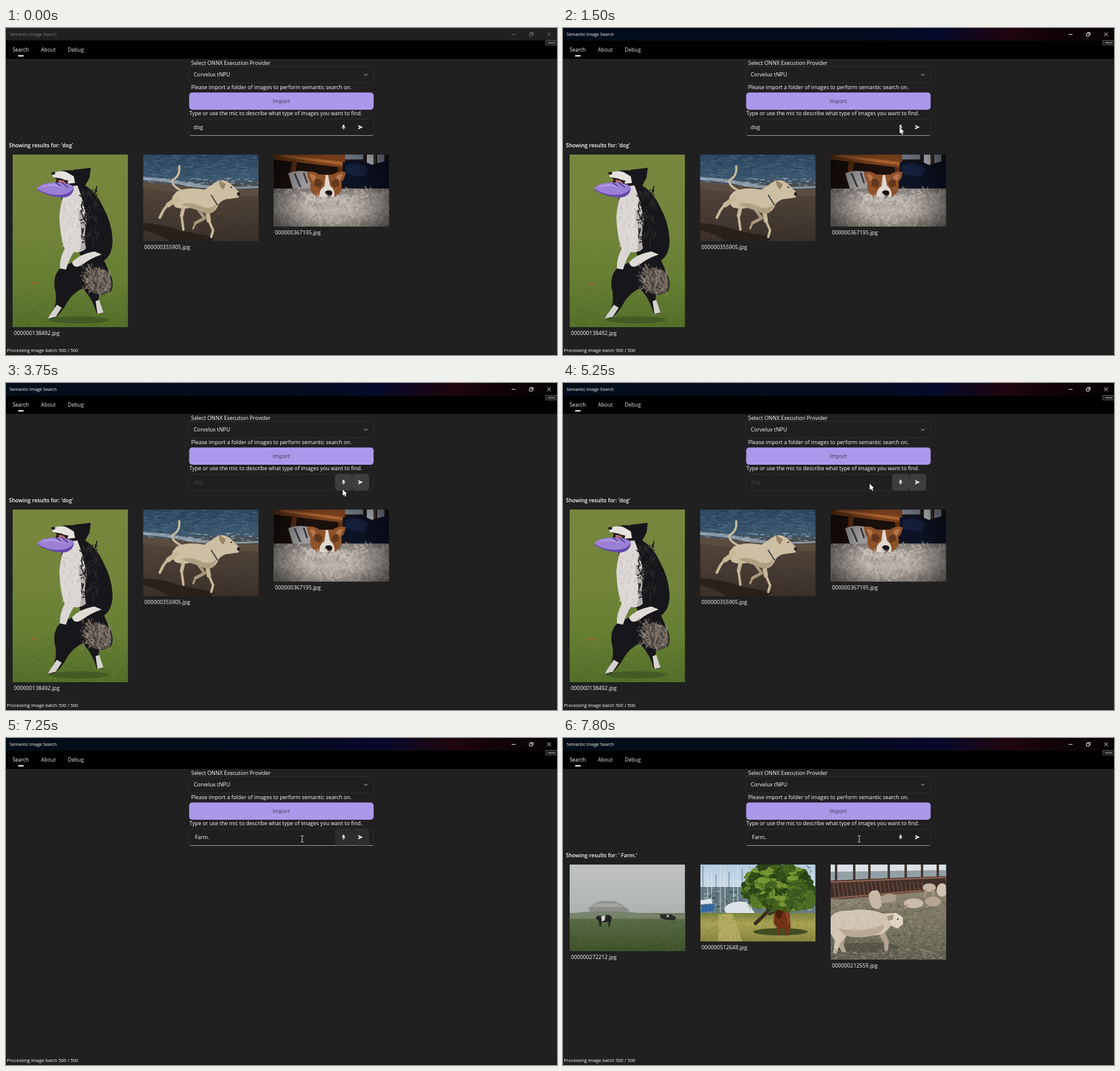
An HTML page with a canvas that plays this animation: 910 by 540 pixels, repeating every 8 s.

```html
<!DOCTYPE html>
<html lang="en">
<head>
<meta charset="utf-8">
<title>Semantic Image Search</title>
<style>
html, body { margin: 0; width: 100%; height: 100%; overflow: hidden; background: #202020; }
canvas { display: block; width: 910px; height: 540px; }
</style>
</head>
<body>
<canvas id="stage" width="910" height="540"></canvas>
<script>
const W = 910, H = 540, LOOP = 8000;
const stage = document.getElementById('stage').getContext('2d');
let g = stage, seed = 1;

const clamp = v => Math.max(0, Math.min(1, v));
const ramp = (t, a, b) => clamp((t - a) / (b - a));
const ease = u => u * u * (3 - 2 * u);
const mix = (a, b, u) => a + (b - a) * u;
const rand = () => (seed = (seed * 16807) % 2147483647) / 2147483647;

function text(str, x, y, size = 8.85, color = '#fff', weight = 400) {
  g.font = `${weight} ${size}px "Open Sans", sans-serif`;
  g.fillStyle = color;
  g.fillText(str, x, y);
}
function rect(color, x, y, w, h) { g.fillStyle = color; g.fillRect(x, y, w, h); }
function shape(color, d) { g.fillStyle = color; g.fill(new Path2D(d)); }
function line(color, width, d) {
  g.strokeStyle = color;
  g.lineWidth = width;
  g.stroke(new Path2D(d));
}
function oval(color, x, y, rx, ry, turn = 0) {
  g.fillStyle = color;
  g.beginPath();
  g.ellipse(x, y, rx, ry, turn, 0, 7);
  g.fill();
}
function panel(x, y, w, h, r, fill, border) {
  g.beginPath();
  g.roundRect(x, y, w, h, r);
  g.fillStyle = fill;
  g.fill();
  if (border) { g.strokeStyle = border; g.lineWidth = 1; g.stroke(); }
}
function fade(x0, y0, x1, y1, stops) {
  const f = g.createLinearGradient(x0, y0, x1, y1);
  stops.forEach(([at, color]) => f.addColorStop(at, color));
  return f;
}
// Scattered short strokes: grass, fur, straw, ripples.
function tufts(colors, n, x, y, w, h, dx, dy, width = 0.7) {
  g.lineWidth = width;
  for (const color of colors) {
    g.beginPath();
    for (let i = 0; i < n; i++) {
      const px = x + rand() * w, py = y + rand() * h;
      g.moveTo(px, py);
      g.lineTo(px + (rand() - 0.5) * dx, py + (rand() - 0.5) * dy);
    }
    g.strokeStyle = color;
    g.stroke();
  }
}
function blobs(colors, n, x, y, rx, ry, size) {
  for (let i = 0; i < n; i++) {
    const a = rand() * 6.283, r = Math.sqrt(rand());
    oval(colors[i % colors.length], x + Math.cos(a) * r * rx, y + Math.sin(a) * r * ry,
      size * (0.5 + rand()), size * (0.4 + rand() * 0.6));
  }
}
function vignette(x, y, w, h, color) {
  const f = g.createRadialGradient(x + w / 2, y + h / 2, h * 0.4, x + w / 2, y + h / 2, w * 0.6);
  f.addColorStop(0, '#0000');
  f.addColorStop(1, color);
  rect(f, x, y, w, h);
}
function photo(x, y, w, h, stops, name, paint) {
  g.save();
  g.beginPath();
  g.rect(x, y, w, h);
  g.clip();
  rect(fade(0, y, 0, y + h, stops), x, y, w, h);
  g.lineCap = g.lineJoin = 'round';
  paint();
  g.filter = 'blur(0.7px)';
  g.drawImage(g.canvas, 0, 0);
  g.restore();
  text(name, x + 2, y + h + 13.3);
}

function leapingDog() {
  tufts(['#879a4540', '#4f6a2740', '#90a35040'], 800, 11, 400, 191, 95, 3, 6);
  oval('#33481f88', 120, 482, 50, 6);
  oval('#9c6a2c', 47, 422, 6, 1.6);
  shape('#17161a', 'M112 234L140 231L138 247L131 260Q150 272 160 295Q175 322 176 350Q176 374 162 384L170 402Q181 425 172 436L154 442Q150 455 161 471L150 472Q142 444 126 430Q110 438 101 453Q92 470 80 479L69 480L80 462Q85 446 80 428Q78 405 92 395L125 380L100 320Q86 290 96 258Z');
  shape('#d9d6d4', 'M100 262Q90 285 88 312Q90 350 97 364Q88 382 89 397L99 399Q105 380 112 370Q124 372 132 364Q127 345 134 318Q129 288 118 260Z');
  shape('#b3aeac', 'M118 300Q133 304 132 320Q127 345 132 364L122 369Q128 340 118 300Z');
  tufts(['#b8b3b0', '#efedeb'], 45, 94, 284, 28, 76, 4, 12, 0.8);
  tufts(['#17161a', '#2e2a2c'], 80, 124, 266, 30, 90, 7, 16, 1.6);
  shape('#dedad6', 'M109 387Q122 373 146 369L158 374Q138 381 126 391Q112 399 109 387Z');
  shape('#5d554e', 'M131 402Q150 392 168 402Q180 424 170 436Q148 446 132 428Q122 414 131 402Z');
  tufts(['#8a8177aa', '#36302caa', '#a2978baa'], 60, 126, 396, 46, 40, 10, 18, 1.5);
  tufts(['#17161a'], 40, 100, 396, 34, 32, 10, 12, 1.6);
  shape('#d5d1cc', 'M84 457L92 462L82 477L69 480L73 473ZM148 451L154 449L161 470L151 472Z');
  shape('#17161a', 'M77 243Q88 233 112 235L139 231L136 247Q125 262 104 259L86 252Z');
  shape('#e6e2de', 'M76 241Q88 234 100 238L112 245L114 256L103 257L93 249L77 246Z');
  shape('#2a1a1e', 'M84 248L103 252L100 260L82 256Z');
  oval('#17161a', 78, 240, 3.2, 2.3);
  oval('#b87077', 92, 254, 6, 2.5, 0.3);
  shape('#9b80d6', 'M52 265Q55 257 78 255Q105 254 112 263Q111 277 94 280Q74 279 52 267Z');
  shape('#6448a8', 'M52 266Q72 278 94 275Q107 273 112 264Q111 278 95 280Q74 280 52 268Z');
  line('#c0abee', 1.3, 'M60 262Q76 256 92 263');
  line('#3d2a66', 1.5, 'M82 255L90 261M92 255L102 263');
}

function beachDog() {
  tufts(['#4f708a66', '#1a2f4466', '#6d8aa066'], 150, 226, 210, 192, 38, 20, 2, 1.1);
  shape('#8696a3', 'M226 246Q262 247 300 255Q350 265 418 261L418 264Q360 268 310 263Q260 252 226 251Z');
  tufts(['#b6c2ca', '#93a2ae'], 45, 226, 248, 192, 13, 14, 2, 0.9);
  shape('#5a4d40', 'M226 254Q270 258 320 265L418 266L418 278Q300 276 226 264Z');
  tufts(['#65554444', '#2b221b44'], 200, 226, 270, 192, 82, 12, 2);
  shape('#201a17bb', 'M226 322Q262 324 290 335L345 345L338 352L270 352Q248 338 226 334Z');
  line('#c9bba0', 3.4, 'M291 269Q273 261 275 251Q288 245 286 228');
  line('#a8977b', 5, 'M318 300L328 314L313 322');
  line('#a8977b', 3.2, 'M313 322L309 331');
  shape('#cdbfa3', 'M282 270Q300 262 328 267L346 255Q356 247 370 256L386 272L384 280L370 282Q358 282 351 291Q346 306 332 307Q316 300 304 297Q292 300 280 296Q272 288 275 278Z');
  line('#c6b799', 8, 'M282 282L268 292');
  line('#c6b799', 4.4, 'M266 293L260 301L254 313');
  line('#c6b799', 6, 'M294 293L290 310');
  line('#c6b799', 4, 'M290 311L293 333');
  line('#c6b799', 7, 'M332 300L335 318');
  line('#c6b799', 4, 'M336 320L342 334L339 345');
  shape('#a39274aa', 'M290 291Q305 285 326 296Q340 300 348 290Q346 305 332 307Q316 300 304 297Z');
  shape('#9b8566', 'M352 251L363 258L359 267Q351 262 352 251Z');
  line('#3f464b', 2, 'M339 276L349 292');
  oval('#262322', 384, 274, 2.5, 3);
  oval('#302824', 372, 263, 1.4, 1.2);
}

function rugDog() {
  rect('#1a100c', 442, 209, 116, 58);
  shape('#7a411c', 'M442 209L560 209L560 231L442 217Z');
  shape('#a9632f', 'M458 209L560 222L560 227L450 212Z');
  shape('#5e2e13', 'M472 218L481 220L478 240L470 240ZM548 230L558 230L558 246L550 246Z');
  rect('#78828f', 560, 209, 30, 8);
  rect('#c9d0d8', 596, 209, 11, 18);
  rect('#4a382d', 607, 209, 4, 22);
  rect('#8d97a6', 613, 209, 12, 14);
  shape('#0c1324', 'M556 222Q582 214 604 226L633 218L633 274L556 262Z');
  shape('#15203c', 'M561 227Q580 218 599 232L592 246L561 241Z');
  shape('#9c9a9b', 'M466 240Q482 233 502 238L508 266L474 266Z');
  line('#3c3a40', 3, 'M477 241L486 262M492 240L497 255');
  rect(fade(0, 262, 0, 328, [[0, '#77716e'], [0.3, '#a8a19b'], [0.6, '#b9b2aa'], [1, '#958e86']]), 442, 265, 191, 63);
  tufts(['#d5cfc677', '#6d676244', '#c8c1b777'], 150, 442, 266, 191, 62, 11, 13, 2.4);
  shape('#8e5229', 'M497 238Q508 235 517 242L540 242Q550 235 561 238Q560 249 554 254Q557 272 543 279L514 279Q500 272 503 256Q498 250 497 238Z');
  shape('#b57650', 'M501 241Q509 240 512 247L507 254ZM557 241Q548 240 545 247L551 253Z');
  shape('#61371d', 'M511 250Q519 247 523 256L519 264L509 260ZM537 256Q541 248 549 251L550 260L541 264Z');
  shape('#ded8d1', 'M528 243L532 243L535 260Q545 269 542 279L518 279Q516 268 526 261Z');
  oval('#131112', 533, 272, 6, 4);
  shape('#241b19', 'M528 274L539 274L534 282Z');
  tufts(['#e0dad088', '#c9c2b988'], 60, 494, 276, 72, 12, 7, 11, 1.6);
  vignette(442, 209, 191, 119, '#0009');
}

function foggyFarm() {
  shape('#8e908e', 'M42 281L55 272L63 269L86 270L97 275L109 284L109 289L44 289Z');
  shape('#a5a6a3', 'M48 279L56 273L90 273L100 279Z');
  tufts(['#777a77'], 18, 48, 280, 58, 7, 4, 3, 1);
  rect(fade(0, 284, 0, 352, [[0, '#78836b'], [0.3, '#566844'], [1, '#3d5128']]), 11, 289, 191, 63);
  shape('#78836b', 'M11 290Q60 283 115 288T202 293L202 298L11 298Z');
  tufts(['#72805355', '#31441f55', '#66764855'], 430, 11, 296, 191, 56, 7, 3);
  shape('#242724', 'M56 294L76 292L81 296L79 303L77 312L75 312L75 304L64 304L63 311L60 311L59 302L54 298Z');
  shape('#d0d1cb', 'M63 294L70 293L69 301L64 303Z');
  shape('#292c28', 'M160 291L178 291L187 296L184 301L168 300L161 297Z');
  oval('#bec0b9', 173, 294, 2, 2);
}

function treeFarm() {
  rect('#667b83', 227, 246, 190, 45);
  tufts(['#4b6567', '#97a9aa', '#344d4b'], 60, 227, 253, 190, 33, 12, 4, 2);
  for (let i = 0; i < 12; i++) {
    const x = 231 + i * 7.2;
    line(i % 3 ? '#e1e8ed' : '#566572', 0.9, `M${x} ${211 + i % 4 * 5}L${x + (i % 2)} 288`);
  }
  shape('#3367a1', 'M228 276L251 274L248 286L228 288Z');
  shape('#dce4e9', 'M266 281Q277 267 303 271L317 289L270 290ZM227 268L244 265L247 273L227 275Z');
  rect(fade(0, 287, 0, 336, [[0, '#737d39'], [0.4, '#aaa356'], [1, '#87843d']]), 227, 289, 190, 47);
  shape('#b4aa62', 'M257 291L280 290L296 336L256 336Z');
  tufts(['#c8bb6a77', '#54672a77', '#86953e77'], 260, 227, 290, 190, 46, 4, 7);
  oval('#424d22', 359, 320, 45, 6);
  line('#372e1e', 6, 'M318 306Q336 290 352 270');
  line('#372e1e', 4, 'M341 291Q361 282 374 266');
  blobs(['#294216', '#40601c', '#587b27', '#314d17', '#769634'], 390, 356, 247, 55, 38, 8);
  blobs(['#3b5920', '#4d6c25'], 65, 392, 267, 20, 18, 7);
  tufts(['#91aa4188', '#1b301077'], 260, 304, 211, 105, 73, 5, 4, 1);
  shape('#713315', 'M349 289Q361 281 374 290L376 311L371 326L368 326L367 315L359 315L358 326L354 326L353 313L348 306Z');
  shape('#4a1f10', 'M350 286L355 283L363 286L361 297L354 298Z');
  line('#9c542c', 2, 'M368 289Q373 295 372 307');
}

function sheepBarn() {
  rect('#dce1e5', 442, 209, 191, 28);
  shape('#92a0a5', 'M442 221L633 218L633 231L442 234Z');
  for (const x of [449, 479, 504, 536, 564, 591, 617]) rect('#453832', x, 209, 4, 29);
  shape('#41302a', 'M442 235L633 228L633 256L442 269Z');
  line('#8c6250', 2.5, 'M442 238L633 230M442 265L592 252');
  for (let x = 446; x < 600; x += 7) line('#795342', 1.3, `M${x} 238L${x + 4} 263`);
  rect(fade(0, 254, 0, 366, [[0, '#88816c'], [0.5, '#777461'], [1, '#5d5d50']]), 442, 266, 191, 100);
  shape('#88816c', 'M442 268L633 250L633 270L442 276Z');
  tufts(['#b5ad91aa', '#45473faa', '#918a70aa'], 570, 442, 264, 191, 102, 11, 7, 0.8);
  shape('#c8b9a7', 'M505 258Q509 250 520 252Q527 260 526 277L521 283L511 280Q505 271 505 258Z');
  shape('#ac9d8e', 'M524 262Q540 253 551 260L549 270L526 273Z');
  oval('#cbbcaa', 579, 273, 16, 8);
  oval('#b6a593', 611, 270, 13, 8);
  oval('#c4b4a2', 605, 247, 11, 7);
  oval('#d1c3b3', 626, 251, 9, 11);
  line('#a69685', 3, 'M599 250L598 263M611 251L612 261M568 276L565 281');
  oval('#4b493f99', 500, 346, 56, 8);
  shape('#b4a390', 'M456 320L455 344L461 354L468 354L463 339L470 320ZM519 319L530 338L531 352L537 352L538 337L530 315Z');
  shape('#d3c5b3', 'M442 297Q448 284 474 285Q502 280 529 290L551 289L561 296L562 307L553 315L541 310Q532 326 513 326Q488 332 469 326L457 340L452 357L446 355L449 334L442 323Z');
  shape('#bba996', 'M454 314Q490 323 531 308Q528 324 508 327Q481 332 464 325Z');
  shape('#e0d5c6', 'M535 291L550 289L561 297L561 307L552 314L541 307Z');
  shape('#a99582', 'M535 294L546 291L545 300L537 302Z');
  oval('#302d29', 553, 299, 1.3, 1.3);
  tufts(['#eee2cf66', '#a08f7c55'], 100, 449, 289, 78, 29, 5, 5, 1);
  tufts(['#aba386', '#555548'], 80, 442, 348, 191, 18, 12, 6);
}

function results(label, paint) {
  const layer = document.createElement('canvas');
  layer.width = W;
  layer.height = H;
  g = layer.getContext('2d');
  seed = 4177;
  text(`Showing results for: '${label}'`, 4.8, 197.2, 8.85, '#fff', 600);
  paint();
  g = stage;
  return layer;
}
const dogs = results('dog', () => {
  photo(11, 209, 190.5, 285, [[0, '#78873e'], [0.45, '#71843a'], [0.7, '#677f33'], [1, '#526d29']], '000000138492.jpg', leapingDog);
  photo(226.5, 209, 190.5, 143, [[0, '#2a445c'], [0.28, '#3d586f'], [0.4, '#51453a'], [1, '#3b3029']], '000000355905.jpg', beachDog);
  photo(442.3, 209, 190, 119, [[0, '#1d1718'], [1, '#35302f']], '000000367195.jpg', rugDog);
});
const farm = results(' Farm.', () => {
  photo(11, 209, 190.5, 143, [[0, '#c0c3c2'], [0.5, '#b1b5b2'], [1, '#9a9f99']], '000000272212.jpg', foggyFarm);
  photo(226.8, 209, 190, 126.7, [[0, '#b4cce0'], [0.4, '#d1dfe7'], [1, '#9a9a4a']], '000000512648.jpg', treeFarm);
  photo(442, 209, 190.5, 157, [[0, '#cfd3d5'], [1, '#6e6958']], '000000212559.jpg', sheepBarn);
});

function titleBar(active) {
  rect('#202020', 0, 0, W, 20.5);
  g.globalAlpha = active;
  rect(fade(0, 0, W, 0, [[0, '#020d1a'], [0.5, '#030c1c'], [0.68, '#06092a'], [0.74, '#12071d'],
    [0.81, '#20050e'], [0.9, '#0f0307'], [1, '#060304']]), 0, 0, W, 20.5);
  g.globalAlpha = 1;
  const v = Math.round(mix(130, 255, active)), ink = `rgb(${v},${v},${v})`;
  text('Semantic Image Search', 6, 13.3, 7.2, ink);
  line(ink, 0.9, 'M835 10.5H841.5M893.7 7.3L900 13.6M900 7.3L893.7 13.6M864.5 8.8H869V13.3H864.5ZM866 7.3H870.5V11.8');
}

function chrome() {
  rect('#000', 0, 20.5, W, 30.5);
  text('Search', 11, 39.3, 8.4);
  text('About', 57.8, 39.3, 8.6, '#e6e6e6');
  text('Debug', 102, 39.3, 8.6, '#e6e6e6');
  panel(19.8, 45, 9.5, 2, 1, '#fff');
  panel(891.5, 20.5, 20, 7.5, 0, '#1c1c1c', '#5a5a5a');
  panel(895, 23, 12.5, 2.6, 1, '#6a6a6a');
  text('Select ONNX Execution Provider', 305.8, 60.5);
  panel(303, 63.5, 303.5, 27, 3, '#1f1f1f', '#2d2d2d');
  text('Corvelux tNPU', 310, 80.2);
  line('#ddd', 1, 'M591.5 75.8L594.2 78.5L596.9 75.8');
  text('Please import a folder of images to perform semantic search on.', 305.8, 100.8);
  panel(302.5, 106.5, 304.7, 28.4, 5, '#ab98ea');
  text('Import', 440.6, 124.3, 8.85, '#38333f');
  text('Type or use the mic to describe what type of images you want to find.', 302.8, 144.2);
  text('Processing image batch 500 / 500', 1.5, 535, 7.58);
  rect('#191919', 0, 538.5, W, 1.5);
}

function searchBox(t) {
  const done = t >= 7250;
  const off = done ? 0 : ramp(t, 2650, 2800);
  const shade = done ? 0.45 * (1 - ramp(t, 7250, 7350)) : off;
  panel(303, 150.5, 303.5, 27, 3, '#1f1f1f', '#2d2d2d');
  g.globalAlpha = 1 - off;
  line('#a0a0a0', 1, 'M304 177.5H606');
  g.globalAlpha = 1;
  const v = Math.round(mix(255, 72, off));
  text(done ? 'Farm.' : 'dog', done ? 312 : 309.8, 166.5, 8.85, `rgb(${v},${v},${v})`);
  g.globalAlpha = shade;
  panel(543.5, 150, 28.2, 28, 5, '#3d3d3d');
  panel(571.7, 150, 28.2, 28, 5, '#3d3d3d');
  g.globalAlpha = 1;
  panel(556.1, 159.8, 2.8, 5, 1.4, '#fff');
  line('#fff', 0.8, 'M554.9 163.2Q555 166 557.5 166T560.1 163.2M557.5 166V167.8');
  shape('#fff', 'M581.3 160.3L589.3 163.8L581.3 167.4L582.5 164.4L586 163.8L582.5 163.2Z');
}

function pointer(t) {
  if (t < 450) return;
  if (t >= 7250) {
    const beam = 'M486.7 161.5H488.4L489.2 162.2L490 161.5H491.7M489.2 162.2V171M486.7 171.8H488.4L489.2 171L490 171.8H491.7';
    line('#000', 2, beam);
    line('#fff', 1, beam);
    return;
  }
  const enter = ease(ramp(t, 450, 900)), drop = ease(ramp(t, 2850, 3250));
  const left = ease(ramp(t, 4350, 5000)), settle = ease(ramp(t, 6620, 6950));
  const x = mix(640, 555.6, enter) - 49.6 * left - 18 * settle;
  const y = mix(533, 163.8, enter) + 11.6 * drop - 9.6 * left;
  g.save();
  g.translate(x, y);
  const arrow = 'M.4 .3V10.8L2.8 8.6L4.5 12.4L6.3 11.6L4.7 7.9H8Z';
  line('#000', 1.2, arrow);
  shape('#fff', arrow);
  g.restore();
}

function frame(now) {
  const t = now % LOOP;
  rect('#202020', 0, 0, W, H);
  titleBar(ramp(t, 250, 400));
  chrome();
  searchBox(t);
  if (t < 7250) g.drawImage(dogs, 0, 0);
  else if (t >= 7550) g.drawImage(farm, 0, 0);
  pointer(t);
  requestAnimationFrame(frame);
}
requestAnimationFrame(frame);
</script>
</body>
</html>
```
